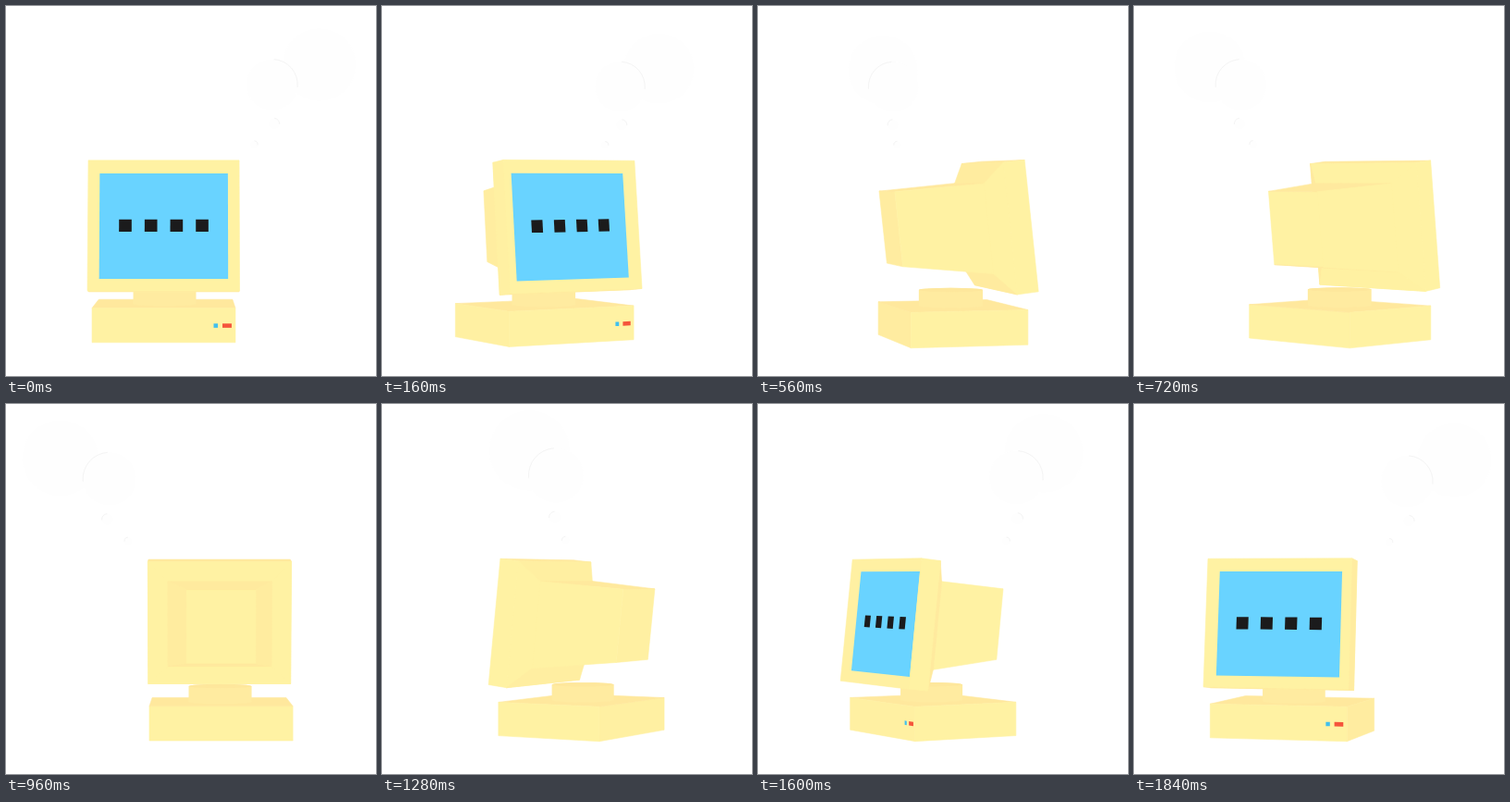
Write an HTML page with a canvas that moves like this. It is 400 by 400 pixels and loops after 1.92 s.

```html
<!DOCTYPE html>
<html>
<head>
<meta charset="utf-8">
<style>
html, body { margin: 0; width: 100%; height: 100%; overflow: hidden; background: #fff; }
canvas { display: block; }
</style>
</head>
<body>
<canvas id="stage" width="400" height="400"></canvas>
<script>
const ctx = document.getElementById('stage').getContext('2d');
const AXIS = 201.5, HORIZON = 187, CAMERA = 1800;
const STEP = 80, STEPS = 24, MID = -30;
const TILT = 0.11;
let sin = 0, cos = 1;

// Model space: x right, y down from the horizon, z toward the viewer.
const turn = ([x, y, z]) => [x * cos + z * sin, y, z * cos - x * sin];

function project([x, y, z]) {
  const s = CAMERA / (CAMERA - z);
  return [AXIS + x * s, HORIZON + y * s, s];
}

// Point in the leaning monitor: u across, v down the face, w backwards.
const lean = (u, v, w) =>
  [MID + u, -19.5 + 0.994 * v + TILT * w, 56 + TILT * v - 0.994 * w];

const leanRect = (u0, u1, v0, v1, w) =>
  [lean(u0, v0, w), lean(u1, v0, w), lean(u1, v1, w), lean(u0, v1, w)];

const flatRect = (x0, x1, y0, y1, z) =>
  [[x0, y0, z], [x1, y0, z], [x1, y1, z], [x0, y1, z]];

function trace(points) {
  ctx.beginPath();
  points.forEach(([x, y]) => ctx.lineTo(x, y));
  ctx.closePath();
}

// Faces turned to the viewer are the lightest.
function shade(p) {
  const a = p[1].map((c, i) => c - p[0][i]);
  const b = p[2].map((c, i) => c - p[1][i]);
  const nx = a[1] * b[2] - a[2] * b[1];
  const ny = a[2] * b[0] - a[0] * b[2];
  const nz = a[0] * b[1] - a[1] * b[0];
  const k = Math.min(1, Math.max(0, nz / Math.hypot(nx, ny, nz) / 0.6));
  return `rgb(255,${232 + 10 * k},${157 + 6 * k})`;
}

function face(points, color) {
  const turned = points.map(turn);
  const p = turned.map(project);
  let area = 0;
  p.forEach(([x, y], i) => {
    const [nx, ny] = p[(i + 1) % p.length];
    area += x * ny - nx * y;
  });
  if (area <= 0) return;
  trace(p);
  ctx.fillStyle = color || shade(turned);
  ctx.fill();
  if (!color) {
    ctx.strokeStyle = ctx.fillStyle;
    ctx.lineWidth = 0.6;
    ctx.stroke();
  }
}

// Solid between a front and a back rectangle.
function solid(front, back) {
  face([...back].reverse());
  front.forEach((p, i) => {
    const j = (i + 1) % 4;
    face([back[i], back[j], front[j], p]);
  });
  face(front);
}

function base() {
  solid(flatRect(-104.8, 44.9, 134.8, 170.8, 61), flatRect(-104.8, 44.9, 134.8, 170.8, -63));
  face(flatRect(22.2, 26.6, 151, 155.4, 61), '#41c0ee');
  face(flatRect(31.4, 41, 151, 155.4, 61), '#f5553c');
}

function neck() {
  const [x, top, s] = project(turn([MID, 118, -1]));
  const bottom = HORIZON + 134.8 * s, r = 34 * s;
  ctx.fillStyle = '#ffeba0';
  ctx.beginPath();
  ctx.ellipse(x, top, r, 2.2, 0, Math.PI, 2 * Math.PI);
  ctx.ellipse(x, bottom, r, 2.5, 0, 0, Math.PI);
  ctx.fill();
  ctx.fillStyle = '#fee79c';
  ctx.beginPath();
  ctx.ellipse(x, top, r, 2.2, 0, 0, 2 * Math.PI);
  ctx.fill();
}

function screen(front) {
  if (cos < 0.01) return;
  ctx.save();
  trace(front.map(turn).map(project));
  ctx.clip();
  const depth = 6.3;
  face(leanRect(-67.3, 67.3, 13, 123.8, depth), '#69d3ff');
  for (let i = 0; i < 4; i++) {
    const u = (i - 1.5) * 26.8;
    face(leanRect(u - 6.6, u + 6.6, 61.5, 74.5, depth), '#1b1b1c');
  }
  ctx.restore();
}

function monitor() {
  const front = leanRect(-79, 79, 0, 136.3, 0);
  const rim = leanRect(-79, 79, 0, 136.3, 23);
  const joint = leanRect(-57, 57, 20, 114, 39.5);
  const rear = leanRect(-36.5, 36.5, 18.4, 96.4, 129.6);
  const parts = [[joint, rear], [rim, joint], [front, rim]];
  if (cos < 0) parts.reverse();
  parts.forEach(([a, b]) => solid(a, b));
  screen(front);
}

// Almost white thought bubble, seen only by its faint shadow.
function bubble() {
  const side = cos < 0 ? -1 : 1;
  const puffs = [[140, -126, 40], [88, -104, 28], [90, -61, 6], [68, -38, 4]];
  puffs.forEach(([px, py, r], i) => {
    const [x, y, s] = project(turn([px, py, -36]));
    ctx.beginPath();
    ctx.arc(x, y, r * s, 0, 2 * Math.PI);
    ctx.fillStyle = '#fefefe';
    ctx.fill();
    if (!i) return;
    ctx.save();
    ctx.translate(x, y);
    ctx.scale(side, 1);
    ctx.beginPath();
    ctx.arc(0, 0, r * s, -1.5, 0.1);
    ctx.strokeStyle = '#f4f4f4';
    ctx.lineWidth = 1;
    ctx.stroke();
    ctx.restore();
  });
}

function draw() {
  const step = Math.floor(performance.now() / STEP) % STEPS;
  const angle = step / STEPS * 2 * Math.PI;
  sin = Math.sin(angle);
  cos = Math.cos(angle);
  ctx.fillStyle = '#fff';
  ctx.fillRect(0, 0, 400, 400);
  bubble();
  base();
  neck();
  monitor();
  requestAnimationFrame(draw);
}
draw();
</script>
</body>
</html>
```
